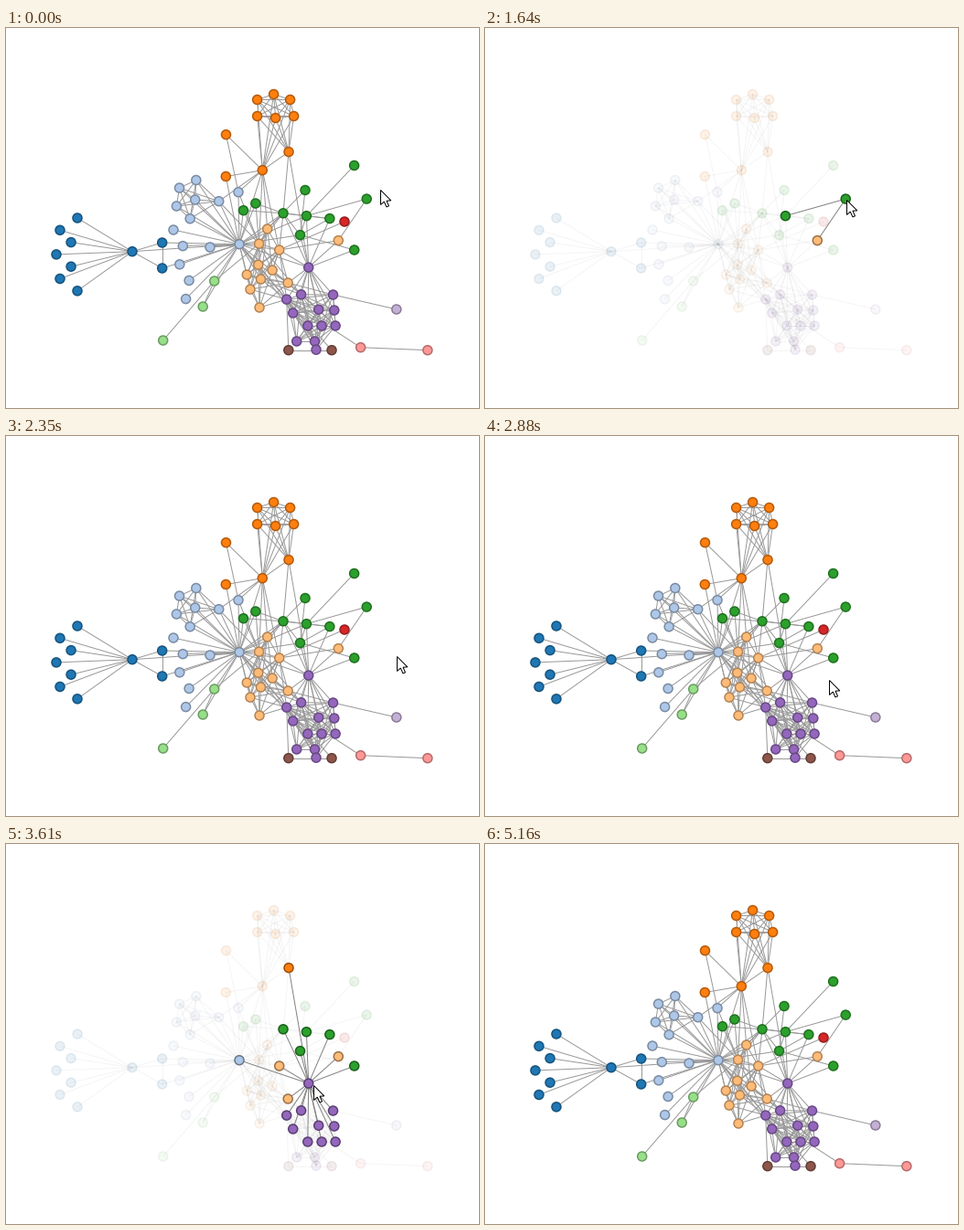
Write a matplotlib script that moves like this. It is 517 px wide and 416 px high and loops after 6.43 s.

```python
import math
from itertools import product

import matplotlib.pyplot as plt
import numpy as np
from matplotlib.animation import FuncAnimation
from matplotlib.collections import LineCollection
from matplotlib.colors import to_rgb
from matplotlib.patches import Polygon

W, H, DPI = 517, 416, 72          # at 72 dpi one point is one pixel
LOOP, TICK = 6430, 10
DIM = 0.1


def row(x, y, dx, dy, n, zig=0, bow=0):
    """Evenly spaced points; zig moves every second one sideways,
    bow bends the whole row."""
    size = math.hypot(dx, dy)
    points = []
    for i in range(n):
        side = zig * (i % 2) + bow * math.sin(math.pi * i / (n - 1))
        points.append((x + dx * i - side * dy / size,
                       y + dy * i + side * dx / size))
    return points


def ring(x, y, radius, start, step, n):
    angles = np.radians(start + step * np.arange(n))
    return [(x + radius * math.cos(a), y + radius * math.sin(a))
            for a in angles]


# Node groups: key -> (colour, centres)
GROUPS = {
    "b": ("#1f77b4", [(138, 244.7), *row(170.7, 235, 0, 28, 2),
                      *row(78, 208, 0, 13.3, 7, zig=15, bow=8)]),
    "s": ("#aec7e8", [(255, 236.7), (254, 179.7), (232.7, 189.7),
                      (206.7, 188), *ring(206.7, 188, 21.5, -87, -56, 4),
                      (223, 240), *row(183, 221, 3.4, 18.9, 5, zig=-7)]),
    "o": ("#ff7f0e", [(280.3, 155.7), (309, 135.6),
                      *row(274.6, 78.5, 18, 0, 3, bow=-6),
                      *row(274.6, 96.5, 20, 0, 3, bow=2),
                      *row(240.3, 162.5, 0.2, -45.8, 2)]),
    "p": ("#ffbb78", [(298.7, 243), (285.7, 220), (276.6, 236.2),
                      (308.2, 279), (363.3, 232.6),
                      *ring(278.5, 275, 16, -38, -62, 4),
                      (278.5, 275), (277, 306)]),
    "g": ("#2ca02c", [*row(303, 202.8, 25.4, 2.9, 3), (321.5, 226.6),
                      (380.7, 243), (394.2, 187.1), (380.6, 150.5),
                      (327, 177.5), *row(259.5, 199.7, 13.3, -7.7, 2)]),
    "m": ("#98df8a", [*row(227.7, 277, -12.5, 28, 2), (171.7, 342)]),
    "r": ("#d62728", [(370, 212)]),
    "k": ("#ff9896", row(387.6, 349.7, 73.2, 3, 2)),
    "v": ("#9467bd", [(330.7, 262.1), (306.7, 297.1), (322.6, 291.8),
                      *row(357.5, 292, 1.3, 17, 3),
                      *row(329.8, 326, 15.3, 0, 2),
                      (313.7, 312), (341.7, 308.2),
                      *row(317.7, 343, 19.8, 0, 2), (339, 352.2)]),
    "l": ("#c5b0d5", [(426.8, 308)]),
    "n": ("#8c564b", row(308.8, 352.7, 47.2, 0, 2)),
}

# Each node on the left is linked to each on the right; a bare key means
# the whole group.
BLOCKS = [
    ("o0-7", "o0-7"), ("s2-7", "s2-7"), ("v0-9", "v0-9"), ("g0-3", "g0-3"),
    ("p0 p3 p6-10", "p0 p3 p6-10"), ("k", "k"), ("n", "n"),
    ("b0", "b"), ("b1", "b2"), ("m0", "m"), ("v10-12", "v1-2 v4-9 v11"),
    ("s0 p2", "s1-2 s8 o0 p0-2 p6-9 g0 g8-9 m0 v1-2"),
    ("s0", "s b0-2 o8 g1 g3 m1 v0 v8"),
    ("o0", "o s1-2 p0-2"), ("s1", "o9"), ("o1", "v0 g0"),
    ("p0", "r p4 g0 v0-1"), ("p1", "p0 p5-7 p9 g0 g7"), ("p5", "p0 p3"),
    ("p3", "v0 v3 v9"), ("p4", "g5 v0"), ("v0", "g0-4"),
    ("g0", "g8-9"), ("g1", "g5-6"), ("g3", "g4 g7"),
    ("v1", "k0 n p6 p8-10"), ("v2", "p7"), ("v3", "l"),
]

# Bursts of change: start, end, number of steps
BURSTS = [(60, 460, 8), (1640, 2240, 11), (2300, 2930, 12),
          (2980, 3610, 11), (4600, 5160, 10)]

# Pointer path: time, x, y
PATH = np.array([
    (0, 410, 178), (240, 394, 188), (1580, 394, 188), (1640, 396, 189),
    (2240, 426, 237), (2300, 428, 242), (2420, 427, 253), (2930, 371, 270),
    (3420, 337, 265), (4600, 336, 263), (5100, 500, 250)])
POINTER_END = 5160

# Hover: node, fade-out start and end, fade-in start and end
HOVERS = [("g5", 230, 460, 1750, 2060), ("v0", 3484, 3610, 4655, 4960)]

ARROW = np.array([(0, 0), (0, 16), (3.8, 12.6), (6.4, 18.4), (9, 17.3),
                  (6.5, 11.7), (11.3, 11.4)])

index, xy, fill = {}, [], []
for key, (colour, points) in GROUPS.items():
    for i, point in enumerate(points):
        index[key, i] = len(xy)
        xy.append(point)
        fill.append(to_rgb(colour))
xy, fill = np.array(xy), np.array(fill)


def expand(spec):
    """Node numbers for text such as 'b0-2 s'."""
    found = []
    for part in spec.split():
        key, span = part[0], part[1:] or f"0-{len(GROUPS[part[0]][1]) - 1}"
        first, _, last = span.partition("-")
        found += [index[key, i]
                  for i in range(int(first), int(last or first) + 1)]
    return found


links = np.array(sorted({tuple(sorted(pair)) for left, right in BLOCKS
                         for pair in product(expand(left), expand(right))
                         if pair[0] != pair[1]}))


def hover_masks(name):
    """Links that touch the node, and the nodes on those links."""
    lit_links = (links == expand(name)[0]).any(axis=1)
    lit_nodes = np.zeros(len(xy), bool)
    lit_nodes[links[lit_links].ravel()] = True
    return lit_links, lit_nodes


MASKS = {h[0]: hover_masks(h[0]) for h in HOVERS}


def step_time(t):
    """Hold time between bursts and quantise it inside them."""
    held = 0
    for start, end, n in BURSTS:
        if t < start:
            return held
        if t < end:
            dt = (end - start) / (n - 1)
            return start + dt * math.floor((t - start) / dt + 1e-6)
        held = end
    return held


def hover_state(t):
    for name, *times in HOVERS:
        if times[0] < t < times[-1]:
            return name, np.interp(t, times, [0, 1, 1, 0])
    return HOVERS[0][0], 0.0


def rgba(rgb, alpha):
    return np.column_stack([rgb, alpha])


fig = plt.figure(figsize=((W + 0.01) / DPI, (H + 0.01) / DPI), dpi=DPI,
                 facecolor="white")
ax = fig.add_axes([0, 0, 1, 1])
ax.set(xlim=(0, W), ylim=(H, 0))
ax.axis("off")

lines = LineCollection(xy[links], linewidths=1, zorder=1)
ax.add_collection(lines)
dots = ax.scatter(xy[:, 0], xy[:, 1], s=100, linewidths=1.5, zorder=2)
pointer = Polygon(ARROW, closed=True, fc="white", ec="black", lw=1,
                  joinstyle="miter", zorder=3)
ax.add_patch(pointer)


def draw(frame):
    t = step_time(frame * TICK)
    name, fade = hover_state(t)
    lit_links, lit_nodes = MASKS[name]

    grey = 0.6 - 0.09 * fade * lit_links
    alpha = np.where(lit_links, 1, 1 - (1 - DIM) * fade)
    lines.set_color(rgba(np.column_stack([grey] * 3), alpha))

    alpha = np.where(lit_nodes, 1, 1 - (1 - DIM) * fade)
    shade = 0.7 - 0.1 * fade * lit_nodes
    dots.set_facecolor(rgba(fill, alpha))
    dots.set_edgecolor(rgba(fill * shade[:, None], alpha))

    pos = [np.interp(t, PATH[:, 0], PATH[:, i]) for i in (1, 2)]
    pointer.set_xy(ARROW + np.round(pos) - 0.5)
    pointer.set_visible(t < POINTER_END)
    return lines, dots, pointer


anim = FuncAnimation(fig, draw, frames=LOOP // TICK, interval=TICK,
                     repeat=True, repeat_delay=0, blit=False)
plt.show()
```
